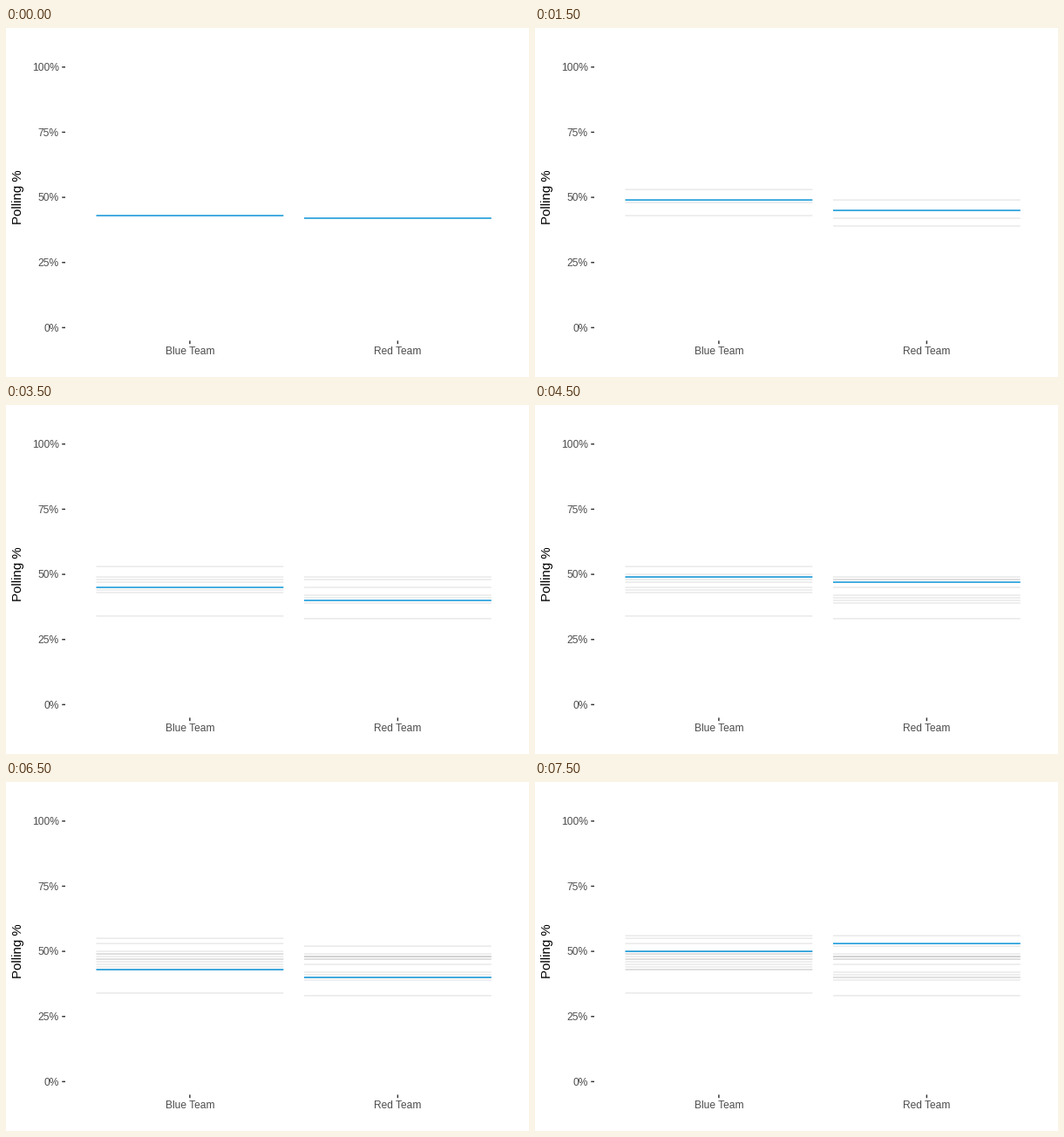
Write a matplotlib script that moves like this. It is 600 px wide and 400 px high and loops after 8 s.

```python
import matplotlib.pyplot as plt
from matplotlib.animation import FuncAnimation

plt.rcParams["font.family"] = "Liberation Sans"

W, H, DPI = 600, 400, 100
PX = 72 / DPI  # points per pixel
LINE = 1.45 * PX
BLUE, SHADOW, LABEL, TICK = "#008fd5", "#808080", "#4d4d4d", "#333333"

# One draw per state: simulated polling share of each team
POLLS = {
    "Blue Team": [43, 53, 48, 49, 34, 47, 44, 45, 50, 49, 46, 47, 55, 43, 56, 50],
    "Red Team": [42, 49, 39, 45, 33, 41, 48, 40, 48, 47, 47, 48, 52, 40, 56, 53],
}
CENTERS = {"Blue Team": 210.9, "Red Team": 449.4}
HALF = 107.4
STATES = 16
PANEL_LEFT, PANEL_BOTTOM = 68, 358.4

fig = plt.figure(figsize=(W / DPI, H / DPI), dpi=DPI, facecolor="white")
ax = fig.add_axes([0, 0, 1, 1])
ax.set(xlim=(0, W), ylim=(H, 0))
ax.axis("off")


def y_pos(pct):
    return 343.4 - 2.986 * pct


def segment(xs, ys, color, **kw):
    line, = ax.plot(xs, ys, color=color, lw=LINE, solid_capstyle="butt",
                    snap=False, **kw)
    return line


def label(x, y, text, size=12, color=LABEL, **kw):
    ax.text(x, y, text, fontsize=size * PX, color=color, va="baseline", **kw)


for pct in range(0, 101, 25):
    y = y_pos(pct)
    segment([PANEL_LEFT - 3.75, PANEL_LEFT], [y, y], TICK)
    label(PANEL_LEFT - 7.3, y + 4.3, f"{pct}%", ha="right")

for team, x in CENTERS.items():
    segment([x, x], [PANEL_BOTTOM, PANEL_BOTTOM + 3.75], TICK)
    label(x, 374.3, team, ha="center")

ax.text(18.3, y_pos(50), "Polling %", fontsize=15 * PX, color="black",
        rotation=90, rotation_mode="anchor", ha="center", va="baseline")

shadows, current = [], {}
for team, x in CENTERS.items():
    span = [x - HALF, x + HALF]
    shadows.append([segment(span, [y_pos(p)] * 2, SHADOW, alpha=0.18, zorder=3)
                    for p in POLLS[team]])
    current[team] = segment(span, [0, 0], BLUE, zorder=4)


def update(state):
    for team, line in current.items():
        line.set_ydata([y_pos(POLLS[team][state])] * 2)
    for marks in shadows:
        for i, mark in enumerate(marks):
            mark.set_visible(i < state)
    return []


anim = FuncAnimation(fig, update, frames=STATES, interval=500,
                     init_func=lambda: update(0), repeat=True, repeat_delay=0)
plt.show()
```
